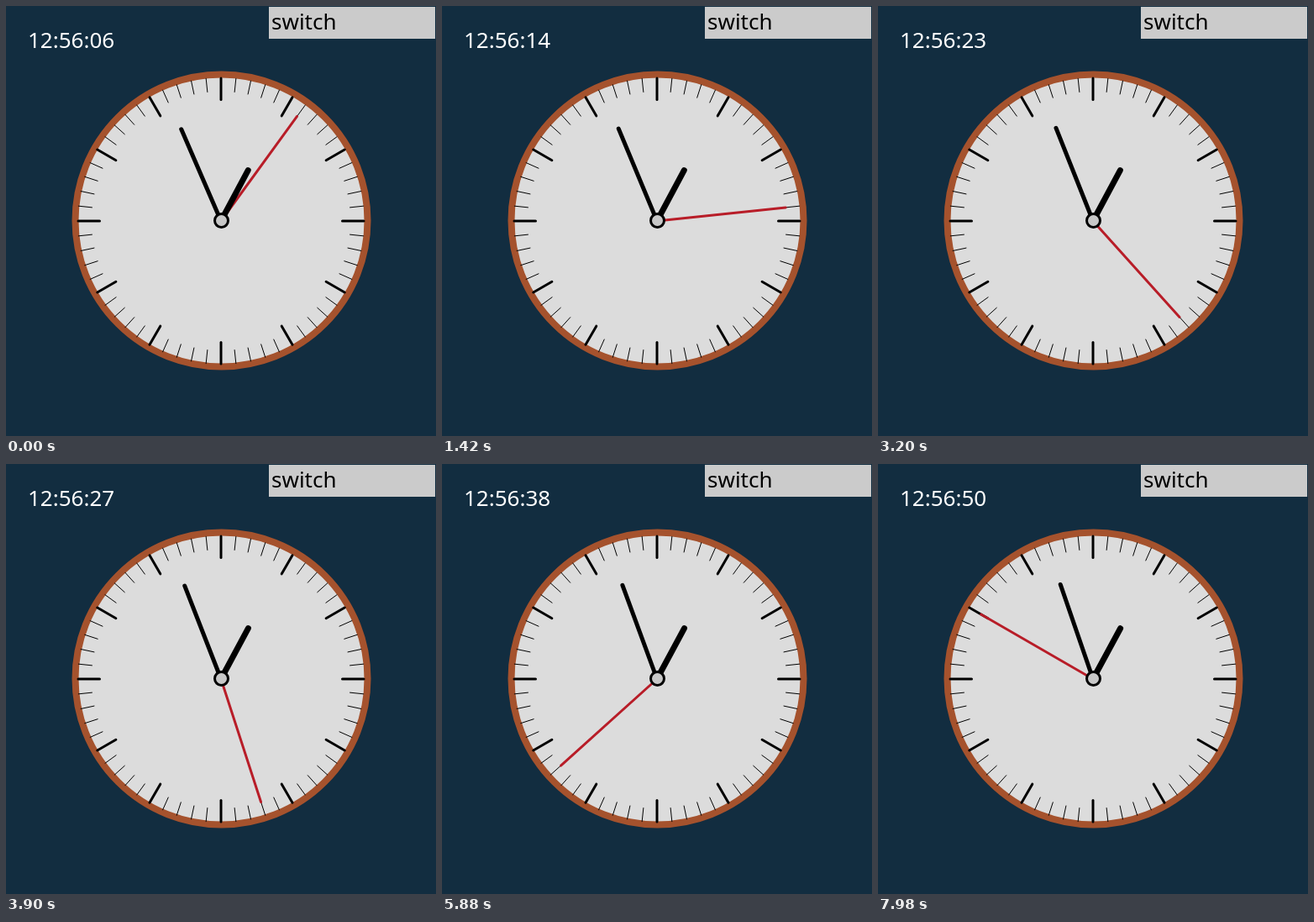
Write an HTML page with a canvas that moves like this. It is 512 px wide and 512 px high and loops after 8 s.

```html
<!DOCTYPE html>
<html lang="en">
<head>
<meta charset="utf-8">
<title>Clock</title>
<style>
  html, body { margin: 0; width: 100%; height: 100%; overflow: hidden; background: #122d40; }
  canvas { display: block; width: 512px; height: 512px; }
</style>
</head>
<body>
<canvas id="stage" width="512" height="512"></canvas>
<script>
const ctx = document.getElementById('stage').getContext('2d');
const LOOP = 8000;
const CENTER = 256;
const FONT = '26px "Noto Sans", "Open Sans", sans-serif';
const HOUR = 12, MINUTE = 56;
const START = 6.485;  // clock seconds at the start of the loop
const RATE = 5.46;    // clock seconds per real second

function disc(radius, fill, stroke, width) {
  ctx.beginPath();
  ctx.arc(256.5, 255.5, radius, 0, Math.PI * 2);
  ctx.fillStyle = fill;
  ctx.fill();
  ctx.strokeStyle = stroke;
  ctx.lineWidth = width;
  ctx.stroke();
}

// Radial line; turn is the fraction of a full circle from twelve o'clock.
function spoke(turn, from, to, width, color, cap = 'round') {
  const a = turn * Math.PI * 2;
  const x = Math.sin(a), y = -Math.cos(a);
  ctx.beginPath();
  ctx.moveTo(CENTER + x * from, CENTER + y * from);
  ctx.lineTo(CENTER + x * to, CENTER + y * to);
  ctx.lineWidth = width;
  ctx.lineCap = cap;
  ctx.strokeStyle = color;
  ctx.stroke();
}

function label(text, x, y, color) {
  ctx.font = FONT;
  ctx.fillStyle = color;
  ctx.fillText(text, x, y);
}

function drawFace() {
  disc(174, '#dcdcdc', '#a5522d', 8);
  for (let i = 0; i < 60; i++) {
    if (i % 5) spoke(i / 60, 154, 171, 1, '#000', 'butt');
    else spoke(i / 60, 144.5, 170, 3, '#000');
  }
}

function drawHands(second) {
  const minute = MINUTE + second / 60;
  const hour = HOUR + minute / 60;
  spoke(second / 60, 0, 154, 3, '#b81d28');
  spoke(hour / 12, 0, 68.5, 7, '#000');
  spoke(minute / 60, 0, 119, 5, '#000');
  disc(8, '#c8c8c8', '#000', 3);
}

function draw(ms) {
  const second = Math.floor(START + RATE * ms / 1000);
  ctx.fillStyle = '#122d40';
  ctx.fillRect(0, 0, 512, 512);
  ctx.fillStyle = '#cbcbcb';
  ctx.fillRect(313, 1, 198, 38);
  label('switch', 316, 28, '#000');
  label(`${HOUR}:${MINUTE}:${String(second).padStart(2, '0')}`, 26, 50, '#fff');
  drawFace();
  drawHands(second);
}

const begin = performance.now();
function frame() {
  draw((performance.now() - begin) % LOOP);
  requestAnimationFrame(frame);
}
frame();
</script>
</body>
</html>
```
